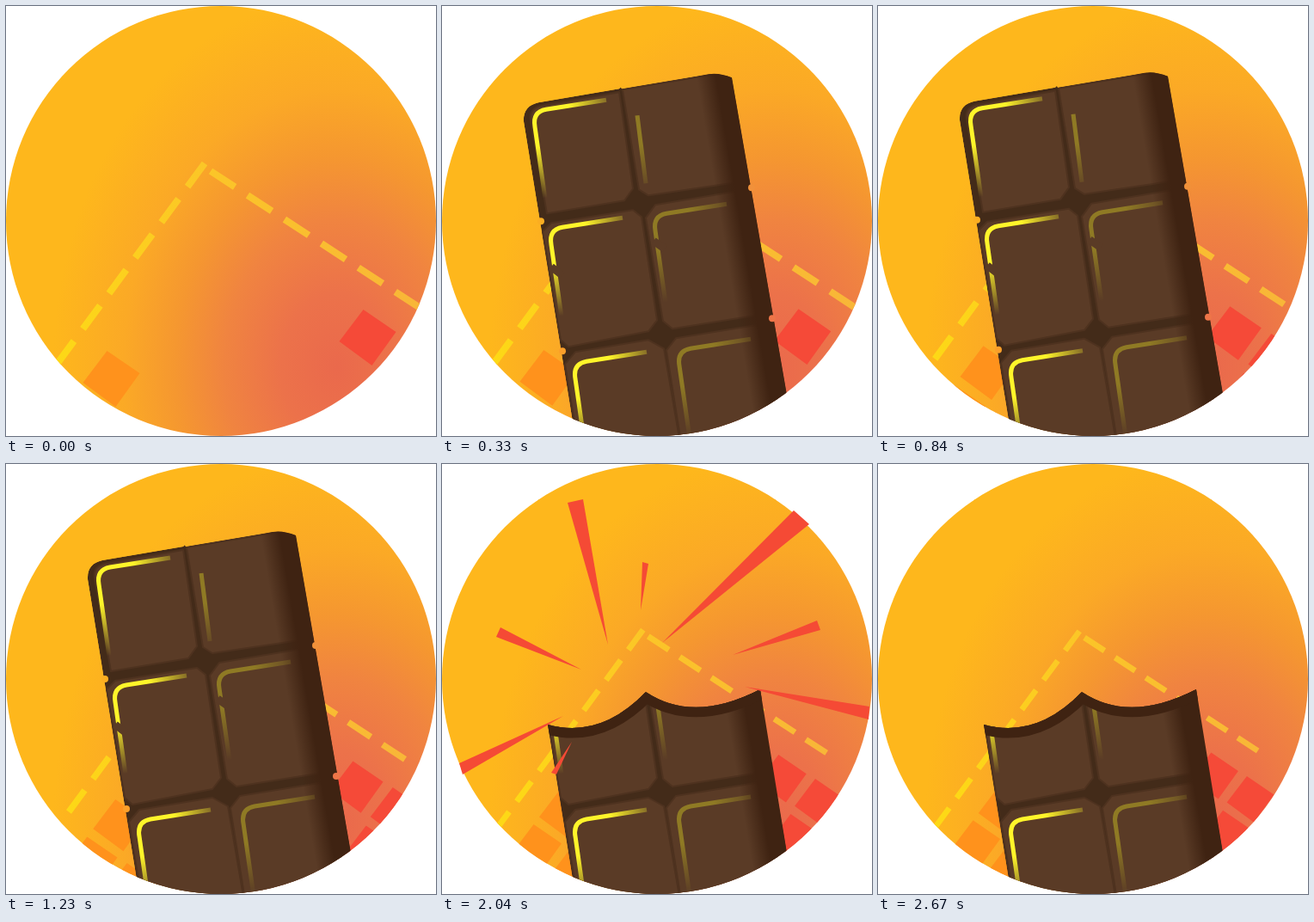
An HTML page for the animation above (2700 ms loop, 500 px wide and 500 px high).

```html
<!DOCTYPE html>
<html lang="en">
<head>
<meta charset="utf-8">
<title>Chocolate bar</title>
<style>
  html, body { margin: 0; width: 100%; height: 100%; overflow: hidden; background: #fff; }
  svg { display: block; width: 100vw; height: 100vh; }
</style>
</head>
<body>
<svg viewBox="0 0 500 500">
  <defs>
    <radialGradient id="glow" gradientUnits="userSpaceOnUse" cx="0" cy="0" r="1"
        gradientTransform="translate(385 420) scale(330 430)">
      <stop offset="0" stop-color="#ea694c"/>
      <stop offset=".2" stop-color="#ec724a"/>
      <stop offset=".4" stop-color="#f08440"/>
      <stop offset=".57" stop-color="#f59730"/>
      <stop offset=".75" stop-color="#fba926"/>
      <stop offset="1" stop-color="#feb71c"/>
    </radialGradient>
    <linearGradient id="dash" gradientUnits="userSpaceOnUse" x1="60" x2="480">
      <stop offset="0" stop-color="#fdd816"/>
      <stop offset=".43" stop-color="#fbc528"/>
      <stop offset="1" stop-color="#f8b638"/>
    </linearGradient>
    <linearGradient id="side" gradientUnits="userSpaceOnUse" x1="309" y1="160" x2="331" y2="156.3">
      <stop offset="0" stop-color="#3f2312" stop-opacity="0"/>
      <stop offset="1" stop-color="#3f2312"/>
    </linearGradient>
    <radialGradient id="bright" gradientUnits="userSpaceOnUse" cx="0" cy="0" r="102">
      <stop offset=".4" stop-color="#fff52a"/>
      <stop offset="1" stop-color="#fff52a" stop-opacity="0"/>
    </radialGradient>
    <radialGradient id="olive" gradientUnits="userSpaceOnUse" cx="0" cy="0" r="102">
      <stop offset=".4" stop-color="#8f7a24"/>
      <stop offset="1" stop-color="#8f7a24" stop-opacity="0"/>
    </radialGradient>
    <path id="shine" d="M13,102 L1,18 Q-2,1 14,-2 L84,-13" fill="none" stroke-width="5"/>
    <path id="body" d="M95,134 Q94,116 112,112 L206,96 L208,94 L209,96 L310,79 Q322,77 337,83 L401,452 L412,520 H158Z"/>
    <path id="bitten" d="M123,303 Q184,320 237,265 Q292,302 370,262 L401,452 L412,520 H158Z"/>
    <clipPath id="disc"><circle cx="250" cy="250" r="250"/></clipPath>
    <clipPath id="whole"><use href="#body"/></clipPath>
    <clipPath id="eaten"><use href="#bitten"/></clipPath>
  </defs>

  <g clip-path="url(#disc)">
    <rect width="500" height="500" fill="url(#glow)"/>
    <g id="pattern">
      <path d="M231,183 l-237,322 M238,192 l251,164" fill="none" stroke="url(#dash)"
          stroke-width="8" stroke-dasharray="33.6 17.7"/>
      <g id="tiles"></g>
    </g>

    <g id="bar">
      <g id="shape" clip-path="url(#whole)">
        <use href="#body" fill="#432b19"/>
        <g fill="#5a3b26" stroke="#4e321f" stroke-width="2" stroke-linejoin="round">
          <path d="M103,132 Q101,120 114,116 L206,100 L222,212 L212,226 L122,241Z"/>
          <path d="M210,97 L312,80 L326,82 L348,204 L240,220 L229,213Z"/>
          <path d="M117,262 L127,252 L222,237 L232,245 L250,365 L240,378 L147,396 L138,388Z"/>
          <path d="M237,246 L248,231 L344,215 L353,222 L372,350 L362,360 L268,375 L257,366Z"/>
          <path d="M143,416 L155,402 L240,388 L258,398 L279,520 H160Z"/>
          <path d="M261,400 L272,386 L364,371 L377,379 L400,520 H280Z"/>
        </g>
        <path d="M270,70 L340,70 L420,520 H340Z" fill="url(#side)"/>
        <g stroke="url(#bright)">
          <use href="#shine" x="107" y="122" transform="translate(0 0)"/>
          <use href="#shine" x="126" y="259"/>
          <use href="#shine" x="154" y="415"/>
        </g>
        <g stroke="url(#olive)">
          <use href="#shine" x="247" y="243"/>
          <use href="#shine" x="275" y="400"/>
          <path d="M-1,7 L9,86" transform="translate(228 120)" stroke-width="5"/>
        </g>
        <path d="M127,303 l13,10 M246,273 l13,9" stroke="#5a3b26" stroke-width="9"/>
        <path id="crust" d="M117,303 L123,303 Q184,320 237,265 Q292,302 370,262" fill="none"
            stroke="#3f2312" stroke-width="23"/>
      </g>
      <g id="notches">
        <circle cx="115" cy="250" r="4" fill="#fbae22"/>
        <circle cx="140" cy="401" r="4" fill="#fb9f2a"/>
        <circle cx="360" cy="211" r="4" fill="#f1913a"/>
        <circle cx="384" cy="363" r="4" fill="#ee7548"/>
      </g>
    </g>
  </g>
  <g id="rays" fill="#f54a35"></g>
</svg>

<script>
const LOOP = 2700, BITE = 1860;
const $ = id => document.getElementById(id);
const clamp = v => Math.min(1, Math.max(0, v));
const span = (t, from, to) => clamp((t - from) / (to - from));
const wave = p => (1 - Math.cos(Math.PI * p)) / 2;

function add(parent, tag, attrs) {
  const el = document.createElementNS('http://www.w3.org/2000/svg', tag);
  for (const k in attrs) el.setAttribute(k, attrs[k]);
  return parent.appendChild(el);
}

// Tile centres, all on one tilted grid
const RED = '#f54a38', ORANGE = '#ff921c';
[[420.5, 385, RED], [470.5, 418, RED], [437, 466, RED],
 [122.5, 433, ORANGE], [87, 480, ORANGE], [137, 513, ORANGE]].forEach(([x, y, fill]) =>
  add($('tiles'), 'path', { d: `M${x - 5},${y - 32} l38,26 l-28,39 l-38,-28Z`, fill }));

// Each ray: tip, then the two corners of its wide end
const rays = [
  [193, 210, 146, 45, 164, 41], [231, 170, 233, 114, 240, 116],
  [256, 208, 409, 54, 427, 70], [338, 222, 436, 182, 440, 193],
  [352, 259, 497, 282, 496, 297], [162, 239, 68, 190, 63, 201],
  [141, 293, 20, 348, 24, 361], [151, 323, 127, 359, 133, 361]
].map(pts => ({ pts, el: add($('rays'), 'polygon', {}) }));

function drawRays(t) {
  const head = 1 - (1 - span(t, BITE, BITE + 150)) ** 2;
  const tail = span(t, BITE + 190, BITE + 420) ** 1.5;
  $('rays').style.display = head > 0 && tail < 1 ? '' : 'none';
  for (const { pts: [x, y, ax, ay, bx, by], el } of rays) {
    const at = (px, py, k) => `${x + (px - x) * k},${y + (py - y) * k}`;
    el.setAttribute('points',
      [at(ax, ay, tail), at(ax, ay, head), at(bx, by, head), at(bx, by, tail)].join(' '));
  }
}

function barOffset(t) {
  const rise = 430 * (1 - span(t, 0, 420)) ** 3;
  return rise - 3.8 * (1 - wave(span(t, 420, 1100)));
}

function draw(now) {
  const t = now % LOOP;
  const scale = 1 - 0.17 * wave(t / LOOP);
  $('pattern').setAttribute('transform', `translate(250 250) scale(${scale}) translate(-250 -250)`);
  $('bar').setAttribute('transform', `translate(0 ${barOffset(t)})`);

  const eaten = t >= BITE;
  $('shape').setAttribute('clip-path', `url(#${eaten ? 'eaten' : 'whole'})`);
  $('crust').style.display = eaten ? '' : 'none';
  $('notches').style.display = eaten ? 'none' : '';
  drawRays(t);
}

const start = performance.now();
(function tick() {
  draw(performance.now() - start);
  requestAnimationFrame(tick);
})();
</script>
</body>
</html>
```
